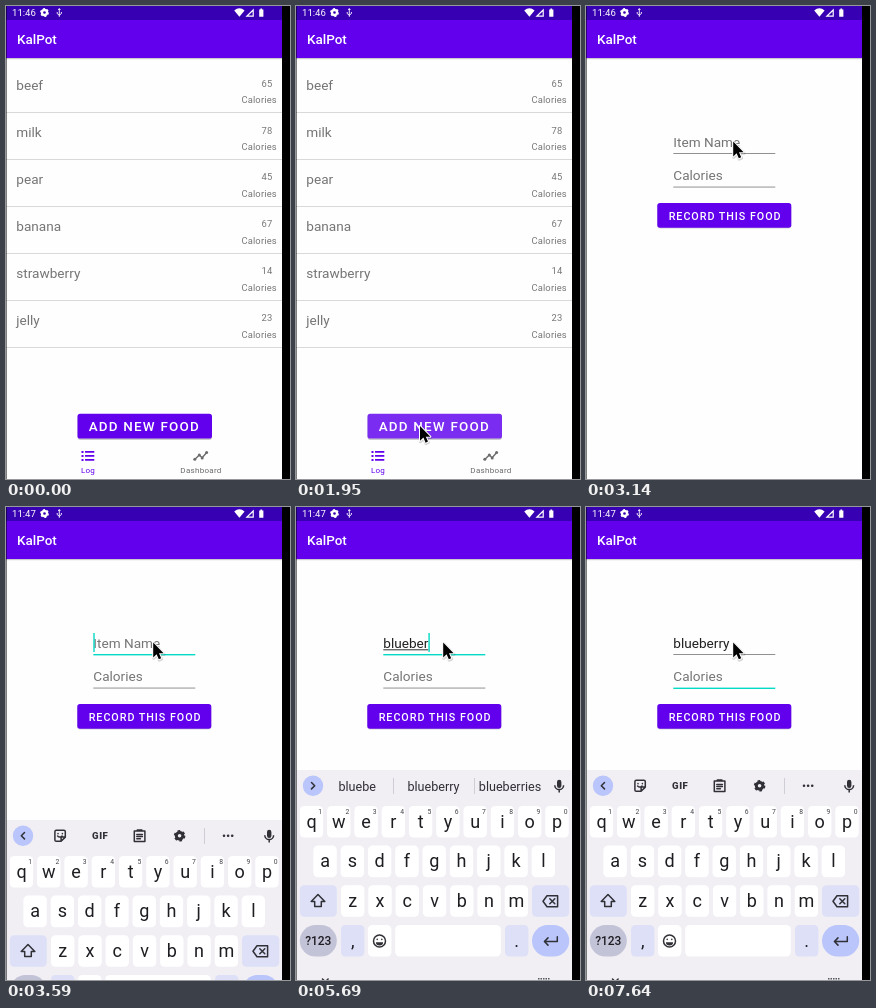
Recreate the animation shown at these times as an HTML page. Size 284x473 px, loop 8 s.

```html
<!DOCTYPE html>
<html lang="en">
<head>
<meta charset="utf-8">
<title>Food log</title>
<style>
  html, body { margin: 0; width: 100%; height: 100%; overflow: hidden; background: #fff; }
  svg { display: block; width: 284px; height: 473px; font-family: Roboto, "Noto Sans", sans-serif; }
  .item, .field { font-size: 13.6px; }
  .item, .hint, .small { fill: #757575; }
  .small { font-size: 9.4px; letter-spacing: .0178em; }
  .title { font-size: 13.44px; font-weight: 500; fill: #fff; }
  .button { font-weight: 500; letter-spacing: .0892em; fill: #fff; }
  .nav { font-size: 8.06px; letter-spacing: .033em; }
  .word { font-size: 12.6px; fill: #303036; }
  .key { font-size: 18px; fill: #1d1d22; }
  .digit { font-size: 6.8px; fill: #44444c; }
  .line { fill: none; stroke: #303036; stroke-width: 1.5; stroke-linejoin: round; stroke-linecap: round; }
  .mid { text-anchor: middle; }
</style>
</head>
<body>
<svg id="stage" viewBox="0 0 284 473">
  <defs>
    <g id="gear">
      <circle r="3.3" fill="none" stroke="currentColor" stroke-width="3"/>
      <circle r="4.9" fill="none" stroke="currentColor" stroke-width="1.8" stroke-dasharray="2.57 2.56"/>
    </g>
    <g id="mic">
      <rect x="-2.2" y="-6.3" width="4.4" height="8.2" rx="2.2" fill="currentColor"/>
      <path d="M-4.4-.8a4.4 4.4 0 0 0 8.8 0M0 3.6v2.8" fill="none" stroke="currentColor" stroke-width="1.5"/>
    </g>
  </defs>
  <rect width="284" height="473" fill="#fefefe"/>
  <rect y="52" width="284" height="1" fill="#000" opacity=".2"/>
  <rect y="53" width="284" height="1" fill="#000" opacity=".04"/>
  <rect y="14" width="284" height="38" fill="#6200ee"/>
  <rect width="284" height="14" fill="#3700b3"/>
  <g fill="#fff" color="#fff">
    <text id="clock" x="6" y="10.3" font-size="9.6"></text>
    <use href="#gear" transform="translate(38.5 6.5) scale(.76)"/>
    <path d="M53.3 2.6v8.2M51.2 6v1.6l2.1 1.6 2.1-1.6V6M52.2 4l1.1-1.4L54.4 4" fill="none" stroke="#fff" stroke-width=".9"/>
    <path d="M228.2 4.4q5.2-4.2 10.4 0L233.4 10.8zM247.8 2.4v8.4h-8.4zM253.2 3.4h1.2v-1h1.7v1h1.3v7.4h-4.2z"/>
    <path d="M246.6 5.4v4.2h-4.2z" fill="#3700b3"/>
  </g>

  <g id="list">
    <text class="title" x="11" y="38.4">KalPot</text>
    <g id="rows"></g>
    <rect x="71.5" y="409" width="134.5" height="25" rx="3" fill="#000" opacity=".2"/>
    <rect id="add" x="71.5" y="407.8" width="134.5" height="24.8" rx="2.7" fill="#6200ee"/>
    <text class="button" x="82.7" y="425" font-size="13.44">ADD NEW FOOD</text>
    <g fill="#6200ee">
      <path d="M75.5 445h2v2h-2zm0 4h2v2h-2zm0 4h2v2h-2zM79 445h9.3v1.8H79zm0 4h9.3v1.8H79zm0 4h9.3v1.8H79z"/>
      <text class="nav mid" x="82" y="467.2">Log</text>
    </g>
    <g fill="#6b6b6b">
      <path d="M189 453.2l4.3-4.2 2.8 2.7 4.4-5" fill="none" stroke="#6b6b6b" stroke-width="1.4"/>
      <circle cx="188.8" cy="453.2" r="1.5"/><circle cx="193.3" cy="449" r="1.5"/>
      <circle cx="196.2" cy="451.9" r="1.5"/><circle cx="200.6" cy="446.6" r="1.5"/>
      <text class="nav mid" x="195" y="467.2">Dashboard</text>
    </g>
  </g>

  <g id="form">
    <rect x="0" y="54" width="284" height="419" fill="#fefefe"/>
    <g id="content">
      <text class="title" x="11" y="38.4">KalPot</text>
      <text class="field hint" id="nameHint" x="87.3" y="141">Item Name</text>
      <text class="field" id="name" x="87.3" y="141" fill="#202020"></text>
      <rect id="composing" x="87.3" y="142.3" height="1" fill="#303030"/>
      <rect id="nameLine" x="87.3" width="102" y="147"/>
      <text class="field hint" x="87.3" y="174">Calories</text>
      <rect id="calLine" x="87.3" width="102" y="180.6"/>
      <rect id="caret" width="1.4" height="19" fill="#03dac5"/>
      <rect x="71.3" y="198" width="134" height="24.6" rx="3" fill="#000" opacity=".18"/>
      <rect x="71.3" y="197" width="134" height="24.8" rx="2.7" fill="#6200ee"/>
      <text class="button" x="82.7" y="213.6" font-size="10.75">RECORD THIS FOOD</text>
    </g>
  </g>

  <g id="keyboard">
    <rect y="263" width="284" height="210" fill="#f1eef4"/>
    <circle cx="17" cy="278.7" r="10.2" fill="#b9c5fb"/>
    <path id="chevron" class="line" d="M-1.5-3.2L1.7 0-1.5 3.2"/>
    <use href="#mic" transform="translate(263.2 279)" color="#303036"/>
    <g id="words">
      <path d="M97.5 271v16M178.5 271v16" stroke="#cfcdd5"/>
      <text class="word mid" x="61.2" y="283.6"></text>
      <text class="word mid" x="137.5" y="283.6"></text>
      <text class="word mid" x="214" y="283.6"></text>
    </g>
    <g id="tools">
      <path class="line" d="M50.3 273.3h7.6q1.4 0 1.4 1.4v5.4l-4.2 4.2h-4.8q-1.4 0-1.4-1.4v-8.2q0-1.4 1.4-1.4zM59.3 280.1h-4.2v4.2M51.6 279q2.2 2.2 4.4 0M52 276.4v.3M56.4 276.4v.3"/>
      <text class="mid" x="94.2" y="282.2" font-size="9.6" font-weight="900" letter-spacing=".5" fill="#303036">GIF</text>
      <path class="line" d="M128.3 274h10.6v10.6h-10.6zM131.3 274v-1h4.6v1M130.8 277.5h5.6M130.8 279.6h5.6M130.8 281.7h3.6"/>
      <use href="#gear" x="173.6" y="278.8" color="#303036"/>
      <path d="M198.5 271v16" stroke="#cfcdd5"/>
      <path d="M218 278.8h.01m4.1 0h.01m4.1 0h.01" stroke="#303036" stroke-width="2.6" stroke-linecap="round"/>
    </g>
    <g id="keys"></g>
    <path class="line" d="M22 387.5l6.8 7h-3.5v5h-6.6v-5h-3.5zM247 394.3l4-5.5h10.6v11H251zM253.8 391.8l5 5m0-5l-5 5M261.3 429.8v4.7h-12.8m3.5-3.6l-3.6 3.6 3.6 3.6"/>
    <circle class="line" cx="83.5" cy="434" r="6"/>
    <path class="line" d="M81.2 432.2v.2M85.8 432.2v.2"/>
    <path d="M79.9 435.2h7.2a3.6 3.2 0 0 1-7.2 0z" fill="#303036"/>
    <path class="line" d="M26.5 472l2.8 2.8 2.8-2.8"/>
    <path d="M242 471.7h12" stroke="#55555c" stroke-width="1.4" stroke-dasharray="1.5 1"/>
  </g>

  <rect width="1" height="473" fill="#000" opacity=".5"/>
  <rect x="276" width="8" height="473" fill="#000"/>
  <g id="pointer">
    <path d="M0 0V14.8L3.4 11.6 5.6 16.7 8 15.6 5.8 10.7H10.4z" stroke="#000" stroke-width="3" stroke-linejoin="round" opacity=".16" transform="translate(.4 .9)"/>
    <path d="M0 0V14.8L3.4 11.6 5.6 16.7 8 15.6 5.8 10.7H10.4z" stroke="#fff" stroke-width="2" stroke-linejoin="round" paint-order="stroke"/>
  </g>
</svg>
<script>
const $ = id => document.getElementById(id);
const LOOP = 8000, TEAL = '#03dac5', GREY = '#858585';

const foods = [['beef', 65], ['milk', 78], ['pear', 45], ['banana', 67], ['strawberry', 14], ['jelly', 23]];
$('rows').innerHTML = foods.map(([name, calories], i) => {
  const y = i * 46.9;
  return `<text class="item" x="10.3" y="${84.3 + y}">${name}</text>
    <text class="small mid" x="261" y="${80.6 + y}">${calories}</text>
    <text class="small" x="235.4" y="${97 + y}">Calories</text>
    <rect y="${Math.round(106 + y)}" width="277" height="1" fill="#d9d9d9"/>`;
}).join('');

function key(x, y, label = '', { w = 23.4, fill = '#fff', r = 4.5, size = 18, weight = 400, digit = '' } = {}) {
  return `<rect x="${x}" y="${y}" width="${w}" height="31.6" rx="${r}" fill="${fill}"/>
    <text class="key mid" x="${x + w / 2}" y="${y + 15.8 + size * .33}" style="font-size:${size}px;font-weight:${weight}">${label}</text>
    <text class="digit mid" x="${x + 20.4}" y="${y + 8}">${digit}</text>`;
}
const PITCH = 27.28, soft = '#dde0f7';
const row = (letters, x, y, digits = '') =>
  [...letters].map((c, i) => key(x + i * PITCH, y, c, { digit: digits[i] })).join('');
$('keys').innerHTML =
  row('qwertyuiop', 3.8, 299, '1234567890') +
  row('asdfghjkl', 17.4, 338.6) +
  row('zxcvbnm', 45, 378.2) +
  key(3.8, 378.2, '', { w: 37, fill: soft }) +
  key(236, 378.2, '', { w: 37.2, fill: soft }) +
  key(3.8, 418, '?123', { w: 37, fill: '#c3c3d8', r: 15.8, size: 12, weight: 500 }) +
  key(45, 418, ',', { fill: soft }) +
  key(72, 418) +
  key(99.2, 418, '', { w: 105.6 }) +
  key(209, 418, '.', { fill: soft }) +
  key(236, 418, '', { w: 37.2, fill: '#b9c5fb', r: 15.8 });

// Each track holds [start time, value...]; a value stays until the next start.
const typing = [[0, ''], [3890, 'b'], [4340, 'bl'], [4490, 'blu'], [4940, 'blue'], [5240, 'blueb'],
  [5540, 'bluebe'], [5690, 'blueber'], [5840, 'blueberr'], [5990, 'blueberry']];
const longWords = 'blueberry blueberries';
const suggestions = [[0, ''], [4040, 'b big but'], [4490, 'bl blue blah'], [4640, 'blu blue blur'],
  [5090, 'blue blues blur'], [5390, 'blueb ' + longWords], [5690, 'bluebe ' + longWords],
  [5840, 'blueber ' + longWords], [5990, 'blueberr ' + longWords], [6290, 'blueberry blueberries pie'], [7040, '']];
const pointerPath = [[0, -40, 500], [450, 39, 462], [600, 60, 450], [750, 83, 439], [900, 103, 429],
  [1050, 117, 422], [1200, 124, 420], [2540, 127, 362], [2690, 138, 236], [2840, 149, 151], [3140, 147.2, 135.6]];
const formSlide = [[0, 0, 0], [2100, 13, .65], [2250, 2.8, 1], [2400, 0, 1]];
const keyboardDrop = [[0, 215], [3440, 150], [3590, 50], [3740, 8], [3890, 0]];
const at = (track, t) => track.findLast(([start]) => start <= t).slice(1);

const set = (id, attrs) => { for (const k in attrs) $(id).setAttribute(k, attrs[k]); };
const show = (id, on) => set(id, { visibility: on ? 'visible' : 'hidden' });

function underline(id, focused) {
  set(id, { height: focused ? 1.4 : .9, fill: focused ? TEAL : GREY });
}

function draw(t) {
  const [slide, alpha] = at(formSlide, t);
  const [text] = at(typing, t);
  const [words] = at(suggestions, t);
  const onCalories = t >= 7040;
  const onName = t >= 3290 && !onCalories;

  $('clock').textContent = t < 3590 ? '11:46' : '11:47';
  show('list', alpha < 1);
  set('add', { fill: t >= 1950 ? '#7b2cf1' : '#6200ee' });
  $('list').firstElementChild.setAttribute('opacity', alpha ? 0 : 1);
  set('form', { opacity: alpha });
  set('content', { transform: `translate(${slide} 0)` });

  $('name').textContent = text;
  const width = text ? $('name').getComputedTextLength() : 0;
  show('nameHint', !text);
  set('composing', { width: onName ? width : 0 });
  underline('nameLine', onName);
  underline('calLine', onCalories);
  set('caret', onCalories ? { x: 87.3, y: 160 } : { x: 87.3 + width, y: 126 });
  show('caret', (onName && t < 6740) || (onCalories && t < 7640));

  set('keyboard', { transform: `translate(0 ${at(keyboardDrop, t)[0]})` });
  show('words', words);
  show('tools', !words);
  set('chevron', { transform: `translate(17 278.7) scale(${words ? 1 : -1} 1)` });
  const parts = words.split(' ');
  $('words').querySelectorAll('text').forEach((el, i) => { el.textContent = parts[i] || ''; });

  set('pointer', { transform: `translate(${at(pointerPath, t).join(' ')})` });
}

const began = performance.now();
function tick() {
  draw((performance.now() - began) % LOOP);
  requestAnimationFrame(tick);
}
tick();
</script>
</body>
</html>
```
